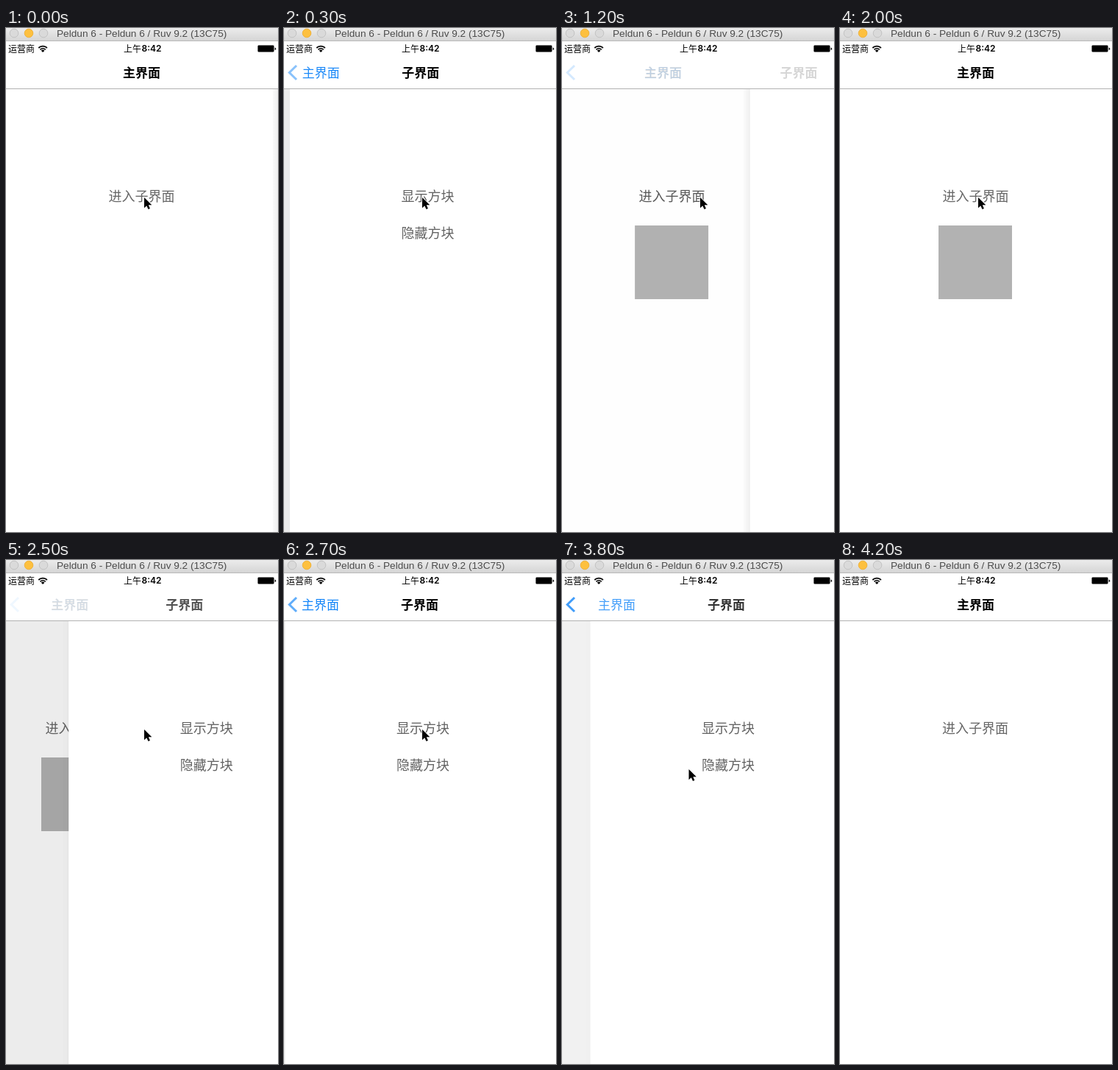
Animation, 370 px wide and 684 px high, one loop 5500 ms. Source, as an HTML page:

```html
<!DOCTYPE html>
<html lang="zh-CN">
<head>
<meta charset="utf-8">
<title>主界面</title>
<style>
html, body { margin: 0; width: 100%; height: 100%; overflow: hidden; background: #fff; }
svg { display: block; width: 370px; height: 684px; }
text { font-family: "Noto Sans CJK SC", "Noto Sans CJK", sans-serif; }
.mid { text-anchor: middle; }
.bar { font-size: 17px; }
.bold { font-weight: 700; }
.btn { font-size: 18px; font-weight: 300; }
.blue { fill: #1385f8; }
</style>
</head>
<body>
<svg viewBox="0 0 370 684" xmlns="http://www.w3.org/2000/svg">
  <defs>
    <linearGradient id="chrome" x2="0" y2="1">
      <stop offset="0" stop-color="#ececec"/><stop offset="1" stop-color="#d5d5d5"/>
    </linearGradient>
    <linearGradient id="fade">
      <stop offset="0" stop-opacity=".02"/><stop offset="1" stop-opacity=".08"/>
    </linearGradient>
    <clipPath id="body"><rect y="83" width="370" height="601"/></clipPath>
  </defs>
  <rect width="370" height="684" fill="#fff"/>

  <g clip-path="url(#body)">
    <g id="main">
      <text id="enter" class="btn mid" x="184.5" y="234.5">进入子界面</text>
      <rect id="block" x="134" y="268" width="100" height="100" fill="#b2b2b2"/>
    </g>
    <rect id="dim" y="83" width="370" height="601"/>
    <g id="child">
      <g id="shadow">
        <rect x="-12" y="83" width="9" height="601" fill="url(#fade)"/>
        <rect x="-4" y="83" width="1" height="601" fill-opacity=".08"/>
      </g>
      <rect x="-3" y="83" width="375" height="601" fill="#fff"/>
      <g fill="#626262">
        <text class="btn mid" x="184.5" y="234.5">显示方块</text>
        <text class="btn mid" x="184.5" y="284.5">隐藏方块</text>
      </g>
    </g>
  </g>

  <rect y="82" width="370" height="1" fill="#b2b2b2"/>
  <path id="chevron" d="M17 51 7.3 60.5 17 70" fill="none" stroke="#1385f8" stroke-width="3"/>
  <g id="left">
    <text id="mainTitle" class="bar bold mid" x="184.5" y="66.5">主界面</text>
    <text id="back" class="bar blue mid" x="184.5" y="66.5">主界面</text>
  </g>
  <text id="childTitle" class="bar bold mid" x="184.5" y="66.5">子界面</text>

  <rect width="370" height="17" fill="url(#chrome)"/>
  <rect y="17" width="370" height="1" fill="#b9b9b9"/>
  <g stroke-width="1">
    <circle cx="11" cy="7" r="5.8" fill="#dadada" stroke="#c3c3c3"/>
    <circle cx="31" cy="7" r="5.8" fill="#fdc03f" stroke="#eeb23c"/>
    <circle cx="51" cy="7" r="5.8" fill="#dadada" stroke="#c3c3c3"/>
  </g>
  <text x="69" y="12" fill="#4c4c4c" style="font:13.65px 'Liberation Sans',Arial,sans-serif">Peldun 6 - Peldun 6 / Ruv 9.2 (13C75)</text>

  <text x="3" y="32.6" font-size="12">运营商</text>
  <path d="M44.3 27A8.3 8.3 0 0 1 55.9 27M46.5 29.3A5.2 5.2 0 0 1 53.7 29.3" fill="none" stroke="#000" stroke-width="1.8"/>
  <path d="M50.1 33 47.8 30.7A3.3 3.3 0 0 1 52.4 30.7Z"/>
  <text x="160" y="32.6" font-size="12" font-weight="500">上午</text>
  <text x="184.5" y="32.4" style="font:600 12px Inter,sans-serif">8:42</text>
  <rect x="342.5" y="23.5" width="22" height="9" rx="1.5" fill="none" stroke="#777"/>
  <rect x="343" y="24" width="21" height="8"/>
  <path d="M365.6 26.5Q367.2 26.8 367.2 28.3T365.6 30.1Z"/>

  <path id="cursor" d="M0 0V14.2L3.3 11.2 5.5 16 7.9 15 5.8 10.3H10.3Z" stroke="#fff" stroke-width="1.4" paint-order="stroke"/>
</svg>
<script>
const LOOP = 5500, STEP = 100, WIDTH = 375;
const moves = [
  { at: 5, push: true }, { at: 1069, push: false },
  { at: 2348, push: true }, { at: 3769, push: false }
];
const el = {};
document.querySelectorAll("[id]").forEach(n => el[n.id] = n);

const clamp = v => Math.min(1, Math.max(0, v));
const ramp = (v, a, b) => clamp((v - a) / (b - a));
const smooth = v => v * v * (3 - 2 * v);
const shift = (node, x, y = 0) => node.setAttribute("transform", `translate(${x.toFixed(2)} ${y.toFixed(2)})`);
const alpha = (node, v) => node.setAttribute("opacity", v.toFixed(3));

// share of the way still to go: critically damped spring for pages, ease-out for the bar
const spring = s => (1 + 18.26 * s) * Math.exp(-18.26 * s);
const easeOut = s => (1 - clamp(s / 0.32)) ** 2;

function draw(t) {
  const move = moves.filter(m => m.at <= t).pop() || moves[0];
  const push = move.push;
  const s = Math.max(0, t - move.at) / 1000;
  const away = push ? spring(s) : 1 - spring(s);
  const barAway = push ? easeOut(s) : 1 - easeOut(s);
  const shown = 1 - away;

  shift(el.child, WIDTH * away);
  alpha(el.child, !push && s > 0.42 ? 0 : 1);
  alpha(el.shadow, away);
  shift(el.main, -0.3 * WIDTH * shown);
  alpha(el.dim, push ? Math.min(0.075, 0.1 * shown) : 0.08 * shown ** 3);
  alpha(el.block, t >= 1000 && t < 3700 ? 1 : 0);
  el.enter.setAttribute("fill", t >= 600 && t < 1600 ? "#565656" : "#666");

  shift(el.left, -135 * (1 - barAway));
  shift(el.childTitle, 211 * barAway);
  alpha(el.mainTitle, push ? 1 - ramp(s, 0, 0.17) : ramp(s, 0.11, 0.28));
  alpha(el.back, push ? ramp(s, 0.14, 0.3) : 1 - ramp(s, 0, 0.155));
  alpha(el.childTitle, push ? ramp(s, 0.05, 0.2) : 1 - ramp(s, 0, 0.155));
  alpha(el.chevron, push ? ramp(s, 0.13, 0.46) : 1 - ramp(s, 0, 0.16));

  const k = smooth(ramp(t, 2900, 3400));
  shift(el.cursor, 188 - 15.5 * k, 230 + 54 * k);
  alpha(el.cursor, t < 4200 ? 1 : 0);
}

const start = performance.now();
function tick() {
  const t = (performance.now() - start) % LOOP;
  draw(Math.floor(t / STEP) * STEP);
  requestAnimationFrame(tick);
}
tick();
</script>
</body>
</html>
```
